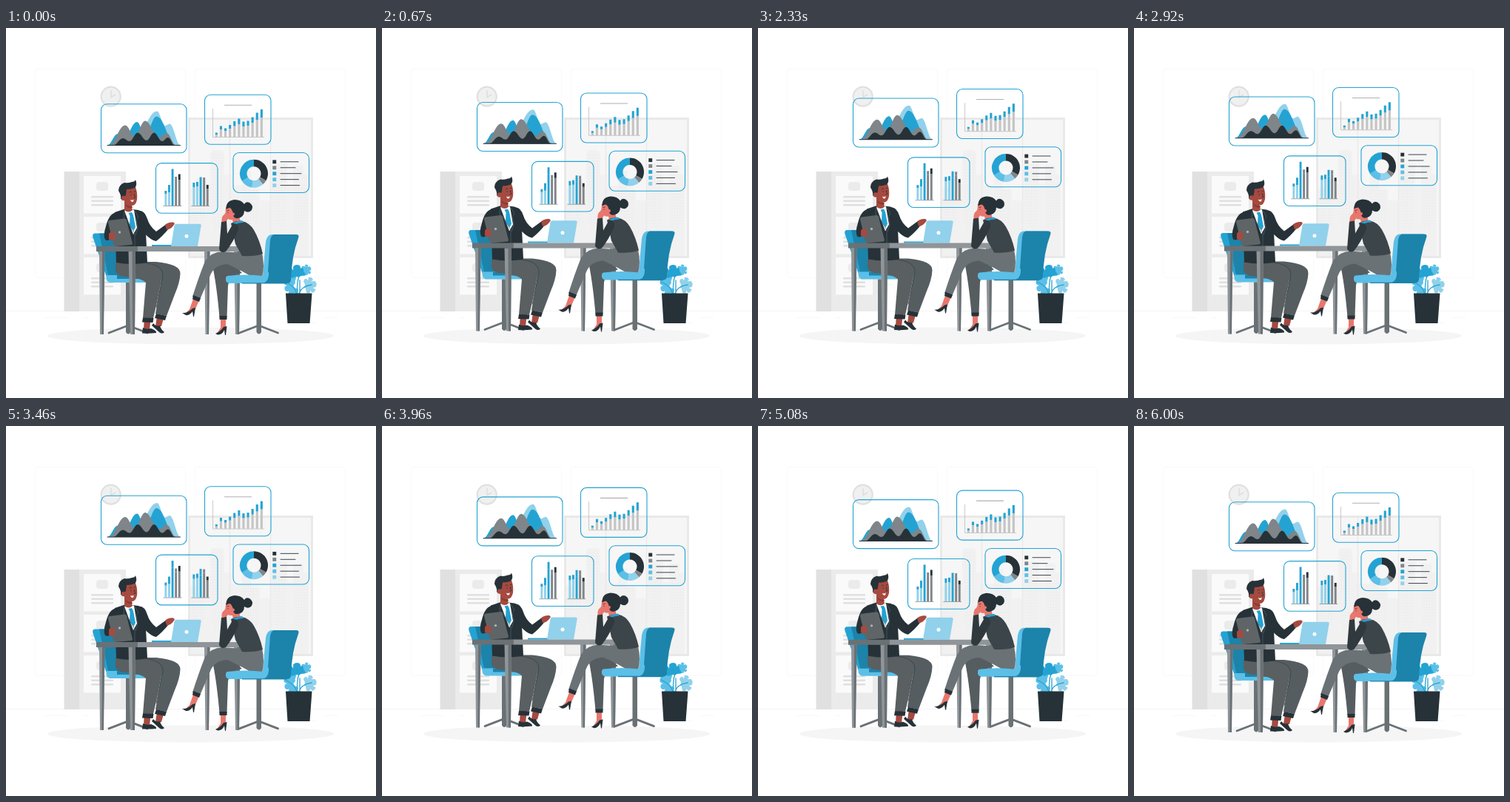
These frames come from a looping animation (500x500 px, 6.04 s). An HTML page:

```html
<!DOCTYPE html>
<html lang="en">
<head>
<meta charset="utf-8">
<title>Business meeting</title>
<style>
html, body { margin: 0; width: 100%; height: 100%; overflow: hidden; background: #fff; }
svg { display: block; width: 100vw; height: 100vh; }
.dark { fill: #263238; } .grey { fill: #7f8588; } .blue { fill: #24a3d3; }
.mid { fill: #5cbfe7; } .pale { fill: #91d1eb; } .deep { fill: #1c83aa; }
.steel { fill: #697175; } .skin { fill: #a64a40; } .rose { fill: #e8776e; }
.soft { fill: #c4c4c4; }
.frame { fill: none; stroke: #24a3d3; stroke-width: 1.1; }
.line { fill: none; stroke: #263238; stroke-linecap: round; stroke-linejoin: round; }
</style>
</head>
<body>
<svg viewBox="0 0 500 500" xmlns="http://www.w3.org/2000/svg">
  <defs>
    <path id="leaf" d="M0 0Q-3-3-7-1Q-11-2-10-6L-7-7L-11-9Q-11-14-6-14L-5-11L-4-16Q0-19 4-15L4-11L7-14Q11-12 10-8L7-7L10-5Q10 0 5-1Q2-2 0 0Z"/>
  </defs>

  <!-- room -->
  <g fill="none" stroke="#f9f9f9">
    <rect x="39.500" y="55.500" width="203" height="282" rx="2"/>
    <rect x="255.500" y="55.500" width="203" height="282" rx="2"/>
    <path stroke="#ededed" stroke-width=".6" d="M0 382.500H500"/>
    <path stroke="#f3f3f3" stroke-width=".6" d="M52 391.500H84M104 391.500H112M384 398.500H420M430 391.500H448"/>
  </g>
  <rect x="247.500" y="122.500" width="166" height="187" fill="#f6f6f6" stroke="#e9e9e9" stroke-width="3"/>
  <path fill="#f1f1f1" d="M249 308V215h8v-12h14v8h5V170l3-5h13l3 5v28h10v15h14v-20h12v25h12v15h14v-42h8v-8h15v28h8v-25h14v12h7V308Z"/>
  <g id="city" stroke="#eaeaea" stroke-width="1.400" stroke-dasharray="1.500 2.500"/>
  <path stroke="#ebebeb" stroke-width="1.500" d="M302.500 124V308M357.500 124V308"/>

  <rect x="78.500" y="194" width="21" height="189" fill="#e0e0e0"/>
  <rect x="99" y="194" width="63" height="189" fill="#ebebeb"/>
  <g id="drawers"/>
  <circle cx="141.700" cy="92.700" r="13" fill="#f0f0f0" stroke="#e0e0e0" stroke-width="2.200"/>
  <path d="M142 84V93.500L148 90" fill="none" stroke="#dedede" stroke-width="1.500"/>
  <ellipse cx="249.500" cy="416" rx="193.500" ry="11.500" fill="#f5f5f5"/>

  <!-- plant -->
  <use href="#leaf" class="mid" transform="translate(391 345) rotate(-75) scale(1.250 .9)"/>
  <use href="#leaf" class="mid" transform="translate(389 349) rotate(205) scale(.75)"/>
  <use href="#leaf" class="pale" transform="translate(403 350) rotate(75)"/>
  <use href="#leaf" class="blue" transform="translate(396 337) rotate(-12) scale(1.150 1)"/>
  <use href="#leaf" class="mid" transform="translate(402 329) rotate(65) scale(.65)"/>
  <path class="line" style="stroke:#24a3d3" stroke-width="1.300" d="M394 359Q392 344 398 328M396 359Q399 349 413 347M393 359Q390 348 377 343M397 359V341"/>
  <path class="dark" d="M378 358.500H413.500L410.500 399H380.500Z"/>

  <!-- meeting -->
  <g id="people">
    <path class="blue" d="M120 277.500H143Q147 278 148 282L157 337H136L117.500 283Q116 278 120 277.500Z"/>
    <path class="deep" d="M126 277.500H143Q147 278 148 282L157 334H138Z"/>
    <path class="mid" d="M136 334H216Q216 344 208 344H140Q134 342 136 334Z"/>
    <path class="deep" d="M150 334H216Q215 338 211 339H150Z"/>
    <g id="base">
      <path class="line" style="stroke:#697175" stroke-width="2.800" d="M165 402L139 412M165 402L191 412"/>
      <path class="steel" d="M162 344h6.500V411q-3.200 5-6.500 0Z"/>
    </g>

    <!-- rear table legs -->
    <path fill="#8f9598" d="M268 301h7.500L274 414h-4.500ZM308 301h8.500L315 414h-5Z"/>
    <path class="steel" d="M272 301h3.500L274 414h-2ZM312.500 301h4L315 414h-2.500Z"/>

    <!-- seated man -->
    <path class="skin" d="M187 389h9l-2 19h-8ZM204 389h10l-4 14h-8Z"/>
    <path class="dark" d="M185 405Q190 408 196 406Q204 409 203 412Q194 413 184 412.500ZM199 399Q203 404 208 402Q209 407 214 411Q211 414 207 411L197 402Z"/>
    <path fill="#555d61" d="M158 316H203Q236 319 235.500 332Q235 344 228 360L217 389L202 386L211 335Z"/>
    <path fill="#5a5f61" d="M148 316H186Q209 319 211 333Q208 355 199 392L185 392L189 344Q183 338 162 336Q148 335 148 327Z"/>
    <path fill="none" stroke="#394246" stroke-width=".8" d="M183 317Q213 319 212 335L203 378"/>
    <path class="dark" d="M185 391.500l14.500 .500-1 6-14.500-.500ZM203 386l14 3-2 6-14-3Z"/>
    <path class="dark" d="M147 249L162 244L179 246Q186 248 188 256L191 317Q170 321 149 317L148 288Z"/>
    <path fill="#fff" d="M160 247L166 243L173 246L177 270L172 279Z"/>
    <path class="blue" d="M165.500 250L170 249L172 253L175 269L172.500 274L167 267L167.500 254Z"/>
    <path fill="none" stroke="#52616a" stroke-width=".7" d="M160 247L159 257L163 259L174 278V316M173 246L179 255L176 259L178 270L175 280"/>
    <path class="skin" d="M160 217Q169 210 175 215Q178 223 177 232Q175 241 169 240L171 246Q166 251 160 246Z"/>
    <path fill="#873b34" d="M162 238Q166 242 170 240L171 243Q165 244 162 240Z"/>
    <path class="dark" d="M155 231Q156 226 152 220Q152 212 160 209Q165 210 170 208Q174 208 175 205Q178 212 174 216Q169 218 163 218L162 225L160 231Z"/>
    <circle class="skin" cx="159" cy="230" r="3.300"/>
    <path class="line" stroke-width=".8" d="M167 222q2-2 3 0M173 221q2-1 2.500 0M169 225v1M174 224v1M173 225l2 4-2 .500"/>
    <path fill="#fff" d="M168 232q3 1.500 4.500-.5q0 4-2 3.500q-2-.5-2.500-3Z"/>

    <path class="dark" d="M180 247Q187 246 191 258Q194 268 203 275L216 265.500L220 271Q211 282 203 288Q194 287 181 270Z"/>
    <path class="skin" d="M215 266Q219 262 226 262.500Q229 264 227 266Q223 272 217 272.500Z"/>
    <path class="dark" d="M149 249Q139 251 135 268Q131 280 134 286Q139 289 144 282L155 262Z"/>
    <path fill="#5f6567" d="M140 260L160 257.500Q162 257.500 163 260L171 291Q171 293 169 293L148 295Q146 295 145 292L138 263Q138 260 140 260Z"/>
    <circle cx="153.500" cy="276" r="1.700" fill="#adb3b6"/>
    <path class="skin" d="M139 278Q142 274 145 276L148 280L147 285Q142 289 139 285Z"/>

    <!-- table -->
    <path class="blue" d="M197 293H225V295H197Z"/>
    <path class="pale" d="M231 264.800H261.500Q264 264.800 263.600 267.300L259 295H223L227.500 267Q228 264.800 231 264.800Z"/>
    <circle cx="244" cy="281.300" r="2.500" fill="#fff"/>
    <path fill="#8f9598" d="M177 295H315V302H177Z"/>
    <path class="steel" d="M122 295H178V302H122Z"/>
    <path fill="#8f9598" d="M126 302h7.500L131.500 414h-4.500ZM165.500 302h9.500L174 414h-6Z"/>
    <path class="steel" d="M130 302h3.500L132 414h-2.500ZM170.500 302h4.500L174 414h-3Z"/>

    <!-- right chair -->
    <use href="#base" x="176.500"/>
    <path class="mid" d="M359 279H391L380 345H346L351 289Q353 279 359 279Z"/>
    <path class="deep" d="M362 279H392Q397 279 395 284Q386 308 385 341Q384 345 380 345H348Q353 340 354 329L357 287Q358 280 362 279Z"/>

    <!-- seated woman -->
    <path class="rose" d="M253 366l8 2-6 14-9 3-5 2 7-7ZM290 392h7l0 13-7 7-5 1 5-8Z"/>
    <path class="dark" d="M238 385Q245 386 252 379L256 378L254 390L253 390L252 383Q248 389 243 388ZM283 413Q290 410 294 404L298.500 403L297 415L296 415L295 408Q292 415 286 414.500Z"/>
    <path fill="#555d61" d="M280 326Q286 313 304 318L319 331Q303 334 300 348L298.500 391H288.500Q285 351 280 326Z"/>
    <path fill="#6b7275" d="M319 304L346 304Q350 321 346 337H333Q321 329 299 319Q283 320 277 332L262 367L252 363Q261 335 269 315Q277 303 292 302Z"/>
    <path class="dark" d="M253 361l10 4-2 5-9-3.500ZM288.500 389h10v5h-10Z"/>
    <path class="rose" d="M297 242H308L315 253L317 262L307 264L306 259Q299 260 298 254L296.500 250Z"/>
    <path fill="#3c4549" d="M304 264Q311 260 319 261Q329 263 335 273Q343 287 347 305Q336 309 319 308L310 292Z"/>
    <path class="blue" d="M307 263Q312 261 319 260L321 263Q314 263 309 266Z"/>
    <path fill="#303a3e" d="M291 262L298 260L299 278L307 264Q315 264 314 273Q306 291 297 302Q291 305 288 299Z"/>
    <path class="rose" d="M291.500 262Q291 254 295 252L297 249L299 254Q302 253 302 255L298 261Z"/>
    <path class="dark" d="M297.500 245Q297 233 309 232Q318 232 322 238Q324 234 329 236Q335 240 332 246Q328 251 322 247Q322 255 314 257Q308 258 307 253Q307 247 303 243Q300 243 297.500 245Z"/>
    <path class="line" stroke-width=".8" d="M299 247l2-.5M300 249.500v.500"/>
    <circle class="rose" cx="307" cy="251.500" r="2"/>

    <path class="mid" d="M299 335Q323 332 348 335L355 329Q356 345 344 345H302Q296 344 297 338Q297 336 299 335Z"/>
    <path class="deep" d="M319 344.200H380V345.600H319Z"/>
  </g>

  <!-- charts -->
  <g id="panels">
    <rect class="frame" x="128.500" y="102.700" width="115.500" height="66" rx="8"/>
    <rect class="frame" x="268.500" y="90.200" width="89.500" height="67" rx="8"/>
    <rect class="frame" x="202.500" y="182.600" width="83.500" height="67.700" rx="8"/>
    <rect class="frame" x="307" y="168.500" width="102.500" height="54" rx="8"/>
    <path fill="none" stroke="#b0b0b0" stroke-width="1.100" d="M295 104.200H332"/>
    <path fill="none" stroke="#b5b5b5" stroke-width=".7" d="M279.500 109V147.500H349"/>
    <path fill="none" stroke="#777" stroke-width=".7" d="M212.500 240.500H237.500M250.500 240.500H275"/>
  </g>
</svg>
<script>
const $ = id => document.getElementById(id);
const add = (parent, tag, attrs) => {
  const el = document.createElementNS('http://www.w3.org/2000/svg', tag);
  for (const key in attrs) el.setAttribute(key, attrs[key]);
  $(parent).append(el);
};
const box = (parent, x, y, width, height, attrs) => add(parent, 'rect', { x, y, width, height, ...attrs });
const fill = name => ({ class: name });

for (const y of [200, 255, 310]) {
  box('drawers', 105, y, 50, 50.5, { fill: '#fafafa' });
  box('drawers', 122, y + 8, 16, 12, { rx: 4, fill: '#ebebeb' });
  for (const dy of [27, 32.5, 38]) box('drawers', 115, y + dy, 30, 2.6, { rx: 1, fill: '#e0e0e0' });
}

// lit windows of the skyline
for (const [x, top, columns] of [[280, 171, 4], [252, 220, 5], [320, 215, 6], [362, 195, 5], [392, 212, 5]])
  for (let i = 0; i < columns; i++)
    add('city', 'path', { d: `M${x + i * 3.6} ${top}V${262 + (x + i * 7) % 12}` });

// mountain ridge rounded at each peak and valley
const ridge = (name, points) => {
  let [x, y] = points[0], d = `M${x} ${y}`;
  for (const [nx, ny] of points.slice(1)) {
    const bend = (nx - x) * .4;
    d += `C${x + bend} ${y} ${nx - bend} ${ny} ${nx} ${ny}`;
    [x, y] = [nx, ny];
  }
  add('panels', 'path', { class: name, d: d + 'Z' });
};
ridge('pale', [[170, 158.5], [204, 112.5], [215, 132], [221, 129.5], [236, 158.5]]);
ridge('blue', [[137, 158.5], [151, 143], [159, 149], [177, 127], [188, 144], [203.5, 119.5], [230, 158.5]]);
ridge('grey', [[139, 158.5], [161, 131.5], [174, 146], [188, 125.5], [207, 148], [217, 142], [230, 158.5]]);
ridge('dark', [[145, 158.5], [158, 149], [167, 153], [178, 141.5], [190, 152], [200, 141.5], [211, 153], [219, 148], [228, 158.5]]);
add('panels', 'path', { class: 'line', d: 'M137 158.500H235.500' });

// stacked bar: cap from top to split, body from split to base
const bar = (x, base, width, top, split, cap, body) => {
  box('panels', x, split, width, base - split, fill(body));
  box('panels', x, top, width, split - top, fill(cap));
};

const growth = [[141.5, 144], [132.5, 137], [135.5, 139], [131, 136], [126, 132.5], [122.5, 130],
  [126.5, 133], [125.5, 132], [120.5, 128], [114.5, 124], [110, 121]];
growth.forEach(([top, split], i) => bar(282.8 + i * 6.1, 147.3, 3.1, top, split, 'blue', 'soft'));

const styles = [['blue', 'pale'], ['blue', 'pale'], ['blue', 'blue'], ['grey', 'grey'], ['dark', 'grey']];
const pairs = [[214.4, [220, 212, 190.5, 201, 197.5], [224, 222, 200, 206, 205]],
  [252.4, [209, 208, 201.5, 202, 212], [215, 214, 210, 207, 217]]];
for (const [x, tops, splits] of pairs)
  tops.forEach((top, i) => bar(x + i * 4.6, 240.2, 2.9, top, splits[i], ...styles[i]));

// ring chart, angles in degrees clockwise from the top
const ring = [['dark', 0, 120], ['grey', 120, 140], ['pale', 140, 188], ['mid', 188, 238], ['blue', 238, 360]];
const point = (deg, r) => {
  const a = deg * Math.PI / 180;
  return `${335 + r * Math.sin(a)} ${196.7 - r * Math.cos(a)}`;
};
for (const [name, from, to] of ring)
  add('panels', 'path', { class: name, d: `M${point(from, 19)}A19 19 0 0 1 ${point(to, 19)}L${point(to, 9.5)}A9.5 9.5 0 0 0 ${point(from, 9.5)}Z` });

[['dark', 395], ['grey', 391], ['blue', 399], ['mid', 395.5], ['pale', 396.5]].forEach(([name, end], i) => {
  const y = 180.8 + i * 7.95;
  box('panels', 360.3, y - 2.4, 4.9, 4.9, fill(name));
  add('panels', 'path', { class: 'line', 'stroke-width': .9, d: `M371 ${y}H${end}` });
});

// linear rise of 10 units and back
const rise = (t, period) => -10 * (1 - Math.abs(1 - 2 * (t % period) / period));

// the last 40 ms of each loop rest at the start pose
function draw(now) {
  const t = Math.min(now % 6040, 6000);
  $('panels').setAttribute('transform', `translate(0 ${rise(t, 6000)})`);
  $('people').setAttribute('transform', `translate(0 ${rise(t, 3000)})`);
  requestAnimationFrame(draw);
}
draw(performance.now());
</script>
</body>
</html>
```
